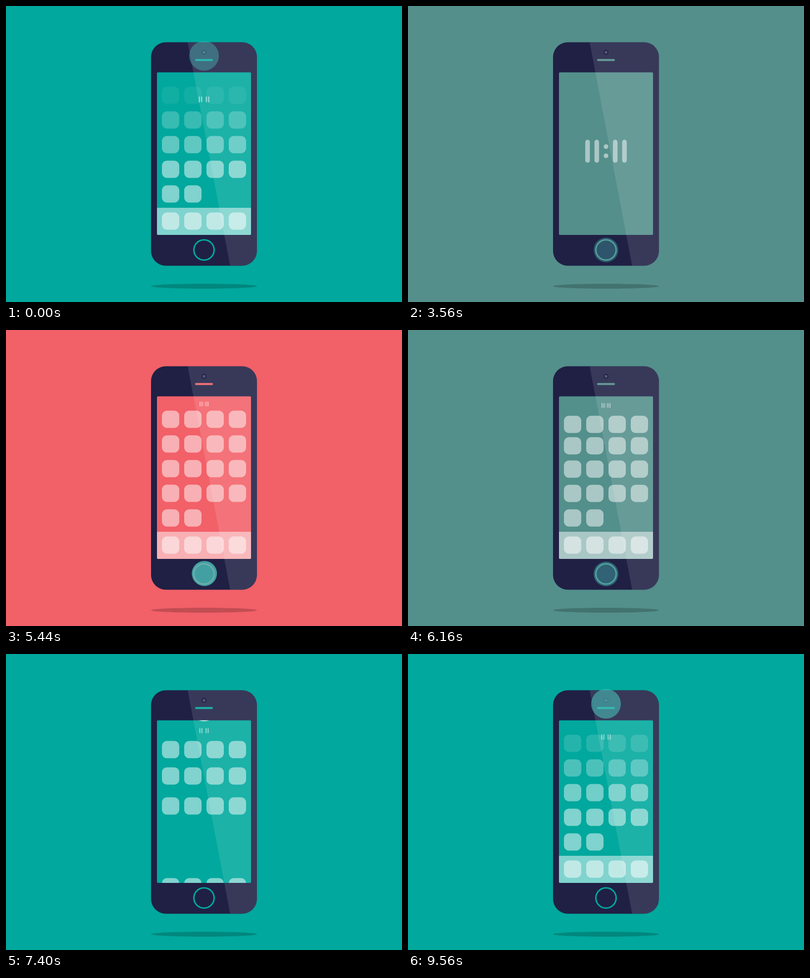
These frames come from a looping animation (800 by 600 pixels, 9600 ms). An HTML page:

```html
<!DOCTYPE html>
<html lang="en">
<head>
<meta charset="utf-8">
<title>Phone</title>
<style>
  html, body { margin: 0; width: 100%; height: 100%; overflow: hidden; }
  svg { display: block; width: 100vw; height: 100vh; }
  .theme { fill: var(--theme); }
  .body { fill: #1f2044; }
  .glass { fill: #fff; fill-opacity: .5; }
  .touch { fill: #4bc1bb; }
  #colon { animation: blink 800ms step-end infinite; }
</style>
</head>
<body>
<svg id="stage" viewBox="0 0 800 600">
  <defs>
    <clipPath id="bodyClip"><rect x="293" y="73.5" width="214" height="453" rx="30"/></clipPath>
    <clipPath id="screenClip"><rect x="305" y="134.5" width="190" height="329.5" rx="2"/></clipPath>
    <g id="icons">
      <rect x="315" width="35" height="35" rx="10"/>
      <rect x="360" width="35" height="35" rx="10"/>
    </g>
  </defs>

  <rect class="theme" width="800" height="600"/>
  <ellipse cx="400" cy="568" rx="107" ry="5" fill-opacity=".2"/>

  <rect class="body" x="293" y="73.5" width="214" height="453" rx="30"/>
  <rect class="theme" x="382" y="107.5" width="36" height="4" rx="2"/>
  <rect class="theme" x="305" y="134.5" width="190" height="329.5" rx="2"/>

  <g clip-path="url(#screenClip)">
    <g id="rows"></g>
    <g id="clock" class="glass">
      <rect x="-45" y="-25" width="10" height="50" rx="5"/>
      <rect x="-25" y="-25" width="10" height="50" rx="5"/>
      <rect x="15" y="-25" width="10" height="50" rx="5"/>
      <rect x="35" y="-25" width="10" height="50" rx="5"/>
      <g id="dots"><circle cy="-10" r="5"/><circle cy="10" r="5"/></g>
    </g>
    <circle id="disc" cx="400" r="30" fill="#fff" fill-opacity=".9"/>
  </g>

  <path clip-path="url(#bodyClip)" d="M367 73.5H507V526.5H452.8Z" fill="#fff" fill-opacity=".11"/>
  <circle class="body" cx="400" cy="94" r="5"/>
  <circle cx="400" cy="94" r="3" fill="#56557a"/>
  <circle cx="400" cy="494.5" r="20.5" fill="#1f2044" stroke="var(--theme)" stroke-width="3"/>
  <circle id="touch" class="touch"/>
</svg>

<script>
const LOOP = 9600, MOVE = 640, DROP = 330;
const TEAL = [0, 168, 157], CORAL = [242, 96, 104];
const $ = id => document.getElementById(id);

// start times of each row, top to bottom, the dock last
const unlock = [3390, 3410, 3440, 3500, 3640, 3880];
const leave = unlock.map((_, i) => 5977 + 34 * i);
const back = [6953, 6962, 6984, 7071, 7270, 7610];

const touches = [
  { on: 2340, off: 3340, fade: 400, from: [235, 306], to: [400, 494.5], grow: 0 },
  { on: 4940, off: 5940, fade: 450, from: [532, 340], to: [400, 494.5], grow: 0 },
  { on: 8340, off: 9470, fade: 260, from: [326, 106], to: [400, 101], grow: 5 }
];

const clamp = x => Math.min(1, Math.max(0, x));
const span = (t, start, length) => clamp((t - start) / length);
const inOut = (x, p) => x < .5 ? (2 * x) ** p / 2 : 1 - (2 - 2 * x) ** p / 2;
const sine = x => Math.sin(x * Math.PI / 2) ** 2;
const move = (t, start) => inOut(span(t, start, MOVE), 5);
const mix = (a, b, k) => a + (b - a) * k;

function buildRows() {
  let html = '';
  for (let i = 0; i < 6; i++) {
    const y = i < 5 ? 163.5 + 50 * i : 418.5;
    const bar = i === 5 ? '<rect x="305" y="409" width="190" height="55"/>' : '';
    const right = i === 4 ? '' : `<use href="#icons" x="90" y="${y}"/>`;
    html += `<g class="glass">${bar}<use href="#icons" y="${y}"/>${right}</g>`;
  }
  $('rows').innerHTML = html;
}

function drawTouch(t) {
  const el = $('touch');
  const p = touches.find(p => t >= p.on && t < p.off + p.fade);
  if (!p) {
    el.setAttribute('opacity', 0);
    return;
  }
  const k = inOut(span(t, p.on, 600), 4);
  const press = (1 - span(t, p.on, 880)) ** 3;
  const release = p.grow * sine(span(t, 9320, 240));
  el.setAttribute('cx', mix(p.from[0], p.to[0], k));
  el.setAttribute('cy', mix(p.from[1], p.to[1], k));
  el.setAttribute('r', 25 + 5 * press + release);
  el.setAttribute('opacity', .8 * span(t, p.on, 200) * (1 - sine(span(t, p.off, p.fade))));
}

function draw(time) {
  const now = time % LOOP;
  // locking runs past the end of the loop
  const t = now < 1000 ? now + LOOP : now;

  const warm = sine(span(t, 3320, 600)) - sine(span(t, 5920, 400));
  const rgb = TEAL.map((c, i) => Math.round(mix(c, CORAL[i], warm)));
  $('stage').style.setProperty('--theme', `rgb(${rgb})`);

  [...$('rows').children].forEach((row, i) => {
    const away = 1 - move(t, unlock[i]) + move(t, leave[i]) - move(t, back[i]);
    row.setAttribute('transform', `translate(0 ${DROP * away})`);
    row.setAttribute('opacity', 1 - span(t, 9370 + 80 * i, 267));
  });

  const low = 1 - move(t, 3370) + move(t, 5992) - move(t, 6950) + move(t, 9320);
  const big = 1 - move(t, 3336) + move(t, 6072) - move(t, 6915) + move(t, 9400);
  $('clock').setAttribute('transform',
    `translate(400 ${150 + 150 * low}) scale(${.2 + .8 * big})`);
  $('dots').setAttribute('opacity', (now + 440) % 800 < 400 ? 1 : 0);

  $('disc').setAttribute('cy', 85 + 130 * (move(t, 6060) - move(t, 7017)));
  drawTouch(t);
}

buildRows();
const begin = performance.now();
function tick() {
  draw(performance.now() - begin);
  requestAnimationFrame(tick);
}
tick();
</script>
</body>
</html>
```
